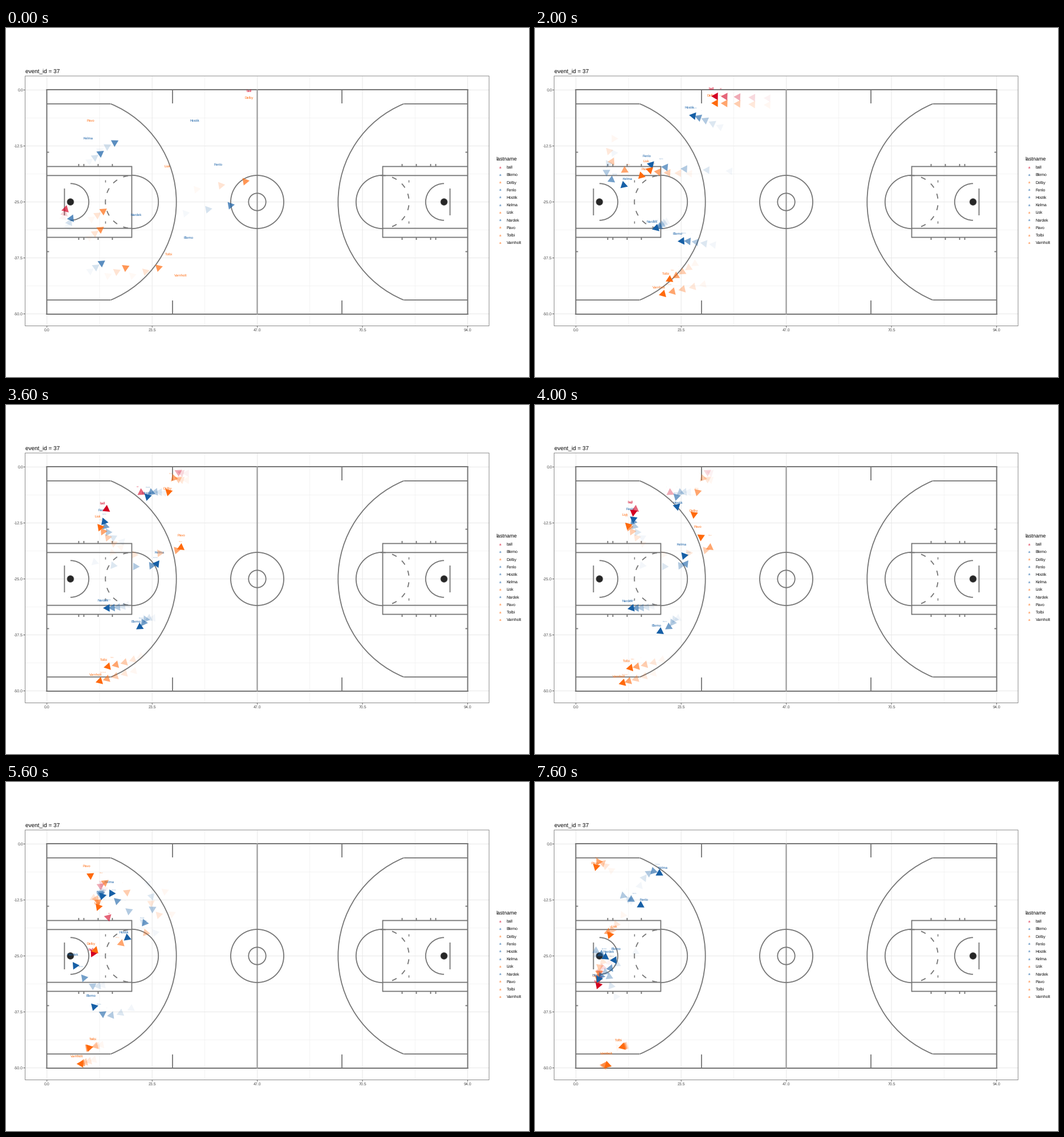
A matplotlib script that plays this animation: 917 px wide and 611 px high, repeating every 8000 ms.

```python
import matplotlib.pyplot as plt
import numpy as np
from matplotlib.animation import FuncAnimation
from matplotlib.patches import Arc, Circle, Polygon, Rectangle

W, H, DPI = 917, 611, 100
STEPS, INTERVAL = 20, 400
PT = 72 / DPI
RED, BLUE, ORANGE = "#d40022", "#165fa6", "#ff6a0d"
LINE = "#757575"
CX, CY = 440, 304

WAKE_ALPHA = [1, 0.6, 0.33, 0.15, 0.05]
OLD_ALPHA = [0.7, 0.18, 0.04]
LABEL_PX, LABEL_RISE = 5.6, 14
TRI_RADIUS, TRI_LAG = 7.7, 7.3

plt.rcParams.update({"font.family": "Liberation Sans", "text.hinting": "none",
                     "text.hinting_factor": 1, "path.snap": False})
fig = plt.figure(figsize=(W / DPI, H / DPI), dpi=DPI, facecolor="white")
ax = fig.add_axes([0, 0, 1, 1])
# Whole numbers are pixel centres.
ax.set_xlim(-0.5, W - 0.5)
ax.set_ylim(H - 0.5, -0.5)
ax.axis("off")


def text(x, y, s, px, color="black", ha="left", **kw):
    return ax.text(x, y + 0.36 * px, s, fontsize=px * PT, color=color,
                   ha=ha, va="baseline", **kw)


def line(x0, y0, x1, y1, color=LINE, width=1.8, z=2):
    ax.plot([x0, x1], [y0, y1], color=color, lw=width * PT, zorder=z,
            solid_capstyle="butt")


def arc(x, y, r, start, end):
    ax.add_patch(Arc((x, y), 2 * r, 2 * r, theta1=start, theta2=end,
                     color=LINE, lw=1.8 * PT, zorder=2))


def draw_panel():
    for i in range(9):
        width, shade = (0.9, "#e6e6e6") if i % 2 == 0 else (0.6, "#ededed")
        x, y = 71.3 + i * 92.2, 108 + i * 49
        line(x, 84, x, 521, shade, width, 1)
        line(33, y, 847, y, shade, width, 1)
        if i % 2 == 0:
            line(x, 521, x, 524, "#333333", 0.8)
            line(30, y, 33, y, "#333333", 0.8)
            text(x, 527.5, f"{11.75 * i:.1f}", 7, "#4d4d4d", "center")
            text(29.5, y, f"{0 - 6.25 * i:.1f}", 7, "#4d4d4d", "right")
    ax.add_patch(Rectangle((33, 83.5), 813.5, 437.5, fill=False,
                           ec="#7f7f7f", lw=0.9 * PT, zorder=2))
    text(33, 74.5, "event_id = 37", 10.1)


def draw_half(side, dash_shift):
    """Half of the court; side is 1 for the left one and -1 for its mirror."""
    def mx(x):
        return x if side == 1 else 2 * CX - x

    def seg(x0, y0, x1, y1, width=1.8):
        line(mx(x0), y0, mx(x1), y1, width=width)

    def turn(x, r, start, end):
        if side == -1:
            start, end = 180 - end, 180 - start
        arc(mx(x), CY, r, start, end)

    seg(71, 107, 71, 501.5, 2)
    for s in (-1, 1):
        def my(d):
            return CY + s * d
        seg(70, my(196.5), CX, my(196.5), 2)
        seg(291.5, my(172.5), 291.5, my(196))
        seg(71, my(171.7), 182.5, my(171.7))
        seg(71, my(62), 220, my(62))
        seg(71, my(46.2), 220, my(46.2))
        seg(71, my(87), 75, my(87))
        seg(174, my(34), 174, my(38), 1.5)
        for x in (127, 136, 161, 186):
            seg(x, my(62), x, my(66.5))
    seg(220, CY - 62.8, 220, CY + 62.8)
    seg(102, CY - 23.5, 102, CY + 23.5)
    turn(112.5, 185.7, -67.7, 67.7)
    turn(112.5, 32.2, -90, 90)
    turn(220, 46.7, -90, 90)
    for k in range(-3, 4):
        middle = 180 + 25.5 * (k + dash_shift)
        turn(220, 46.2, middle - 5.5, middle + 5.5)
    ax.add_patch(Circle((mx(112.5), CY), 6, fc="#262626", ec=LINE,
                        lw=0.6 * PT, zorder=2))


def draw_court():
    draw_half(1, 0)
    draw_half(-1, 0.5)
    line(CX, 107, CX, 501, "#9e9e9e", 2.3)
    arc(CX, CY, 46.5, 0, 360)
    arc(CX, CY, 15.2, 0, 360)


def glide(*keys):
    """Smooth path through a few (step, x, y) keys, sampled at every step."""
    keys = np.array(keys, float)
    t, p = keys[:, 0], keys[:, 1:]
    m = np.gradient(p, t, axis=0)
    s = np.arange(STEPS)
    i = np.clip(np.searchsorted(t, s, side="right") - 1, 0, len(t) - 2)
    h = (t[i + 1] - t[i])[:, None]
    u = (s - t[i])[:, None] / h
    return ((1 + 2 * u) * (1 - u) ** 2 * p[i] + u * (1 - u) ** 2 * h * m[i]
            + u * u * (3 - 2 * u) * p[i + 1] + u * u * (u - 1) * h * m[i + 1])


blue = {
    "Blemo": glide((0, 320, 380), (5, 250, 373), (9, 228, 392),
                   (12, 177, 409), (17, 129, 333), (19, 142, 305)),
    "Fenlo": glide((0, 372, 252), (5, 196, 237), (9, 169, 197),
                   (14, 166, 206), (17, 161, 201), (19, 191, 219)),
    "Hostik": glide((0, 330, 175), (5, 270, 152), (9, 246, 167),
                    (12, 256, 229), (17, 117, 337), (19, 108, 351)),
    "Kelma": glide((0, 144, 206), (3, 125, 259), (5, 162, 277),
                   (8, 262, 280), (14, 181, 188), (17, 205, 155),
                   (19, 224, 163)),
    "Nardek": glide((0, 228, 340), (5, 205, 352), (9, 170, 355),
                    (12, 145, 353), (15, 107, 299), (19, 129, 310)),
}
orange = {
    "Delby": glide((0, 426, 135), (5, 309, 131), (8, 289, 133),
                   (12, 240, 269), (14, 149, 296), (19, 108, 352)),
    "Lisk": glide((0, 282, 255), (5, 194, 246), (9, 160, 208),
                  (14, 159, 225), (17, 131, 265), (19, 138, 266)),
    "Pavo": glide((0, 148, 175), (2, 127, 222), (5, 193, 260), (8, 306, 252),
                  (14, 141, 160), (17, 111, 139), (19, 105, 155)),
    "Tolbi": glide((0, 285, 409), (5, 229, 443), (11, 152, 463),
                   (15, 153, 463), (19, 146, 465)),
    "Varnholt": glide((0, 306, 446), (5, 217, 467), (9, 157, 485),
                      (12, 131, 492), (19, 125, 488)),
}


def ball_path():
    """Delby carries the ball, passes to Fenlo and gets it back for the shot."""
    s = np.arange(STEPS)
    passed = np.interp(s, [7, 9, 12, 14], [0, 1, 1, 0])[:, None]
    offset = np.column_stack([0 * s, np.interp(s, [12, 14], [-12, 10])])
    return (1 - passed) * orange["Delby"] + passed * blue["Fenlo"] + offset


players = sorted([(name, BLUE, path) for name, path in blue.items()]
                 + [(name, ORANGE, path) for name, path in orange.items()],
                 key=lambda player: player[0])
tracks = [("ball", RED, ball_path())] + players

# Where everyone stood at the end of the preceding play.
last_spots = {
    BLUE: [(393, 310), (190, 200), (165, 219), (114, 333), (167, 411)],
    ORANGE: [(419, 268), (170, 320), (165, 352), (209, 419), (267, 419)],
    RED: [(104, 317)],
}


def draw_legend():
    text(859, 228.5, "lastname", 8.7)
    for i, (name, color, _) in enumerate(tracks):
        y = 243 + 13.22 * i
        text(866, y, "a", LABEL_PX, color, "center", alpha=0.7, weight="bold")
        text(877, y, name, 6.9)


moving = []


def triangle(center, heading, color, alpha, z):
    a = np.arctan2(heading[1], heading[0]) + np.arange(3) * 2 * np.pi / 3
    corners = np.add(center, TRI_RADIUS * np.column_stack([np.cos(a), np.sin(a)]))
    moving.append(ax.add_patch(Polygon(corners, fc=color, ec="none",
                                       alpha=alpha, zorder=z)))


def draw_old_wake(step):
    for color, spots in last_spots.items():
        for x, y in spots:
            # Players further up the court were running faster.
            heading = np.array([0.13 * (x - 90), -7])
            for age in range(step, len(OLD_ALPHA)):
                triangle((x, y) - (age - step) * heading, heading, color,
                         OLD_ALPHA[age], 4 - 0.1 * age)


def draw_track(name, color, path, step):
    for age in range(min(step + 1, len(WAKE_ALPHA))):
        x, y = path[step - age]
        if age < 3:
            fade = 0.5 ** age
            moving.append(text(x, y - LABEL_RISE, name, LABEL_PX * fade, color,
                               "center", alpha=fade, zorder=3))
        if step > age:
            d = path[step - age] - path[step - age - 1]
            d = d / max(np.hypot(*d), 1e-6)
            triangle((x, y) - TRI_LAG * d, d, color, WAKE_ALPHA[age],
                     5 - 0.1 * age)


def update(step):
    while moving:
        moving.pop().remove()
    draw_old_wake(step)
    for name, color, path in tracks:
        draw_track(name, color, path, step)
    return moving


draw_panel()
draw_court()
draw_legend()
anim = FuncAnimation(fig, update, frames=STEPS, interval=INTERVAL,
                     init_func=lambda: [], repeat=True, repeat_delay=0,
                     blit=False)
plt.show()
```
